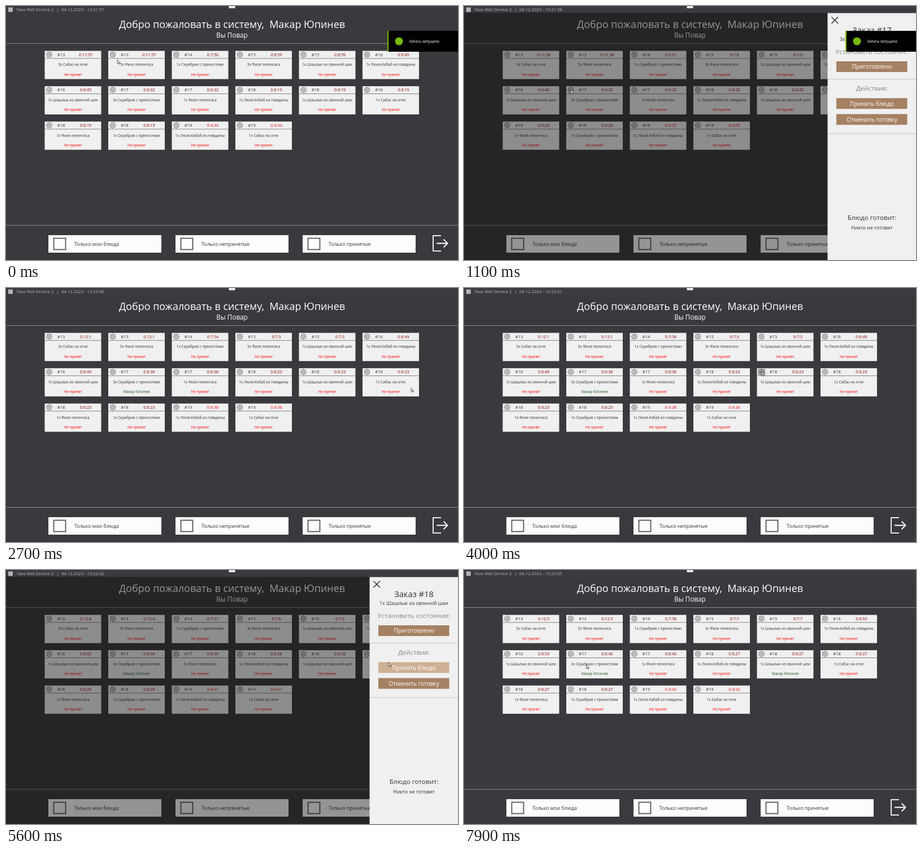
An HTML page for the animation above (8 s loop, 800 px wide and 450 px high).

```html
<!DOCTYPE html>
<html lang="ru">
<head>
<meta charset="utf-8">
<title>Заказы</title>
<style>
html, body { margin: 0; width: 100%; height: 100%; overflow: hidden; background: #3a393e; }
svg { display: block; width: 800px; height: 450px; font-family: "Open Sans", "Noto Sans", sans-serif; }
text { white-space: pre; }
</style>
</head>
<body>
<svg id="stage" viewBox="0 0 800 450"></svg>
<script>
const LOOP = 8000, STEP = 100;
const COOK = 'Макар Юпинев';
const DISHES = {
  s: 'Сибас на огне', f: 'Филе пеленгаса', m: 'Скумбрия с пряностями',
  k: 'Шашлык из свинной шеи', l: 'Люля-Кебаб из говядины'
};
// order number -> age in seconds at the start
const AGE = { 13: 717, 14: 470, 15: 419, 16: 405, 17: 392, 18: 379, 19: 274 };
const ORDERS = ('13 3s,13 5f,14 1m,15 3f,15 1k,16 1l,16 1k,17 3m,' +
  '17 1f,18 1l,18 1k,18 1s,18 1f,18 1m,19 1l,19 1s').split(',');

// times at which a second passes; the clock is drawn a little after the timers
const TICKS = [500, 1800, 2000, 2700, 4200, 5500, 5500, 7200];
const CLOCK_LAG = 200;
// dishes opened in the side panel and accepted on closing
const VISITS = [{ card: 7, open: 1100, close: 2700 }, { card: 10, open: 5300, close: 5900 }];

const stage = document.getElementById('stage');

function add(tag, attrs, parent = stage) {
  const el = document.createElementNS('http://www.w3.org/2000/svg', tag);
  for (const k in attrs) el.setAttribute(k, attrs[k]);
  parent.appendChild(el);
  return el;
}
const rect = (x, y, width, height, fill, parent) => add('rect', { x, y, width, height, fill }, parent);
const line = (d, stroke, w, parent) => add('path', { d, stroke, 'stroke-width': w, fill: 'none' }, parent);
function text(str, x, y, size, fill, parent, anchor = 'middle') {
  const el = add('text', { x, y, 'font-size': size, fill, 'text-anchor': anchor }, parent);
  el.textContent = str;
  return el;
}
function put(el, str) {
  if (el.textContent !== str) el.textContent = str;
}
const show = (el, on) => el.setAttribute('display', on ? 'inline' : 'none');

function gearPath(cx, cy) {
  const pts = [];
  for (let i = 0; i < 32; i++) {
    const r = i % 4 < 2 ? 5 : 3.9;
    const a = (i - 0.5) * Math.PI / 16;
    pts.push((cx + r * Math.cos(a)).toFixed(2) + ' ' + (cy + r * Math.sin(a)).toFixed(2));
  }
  return 'M' + pts.join('L') + 'Z';
}

function makeCard(order, i) {
  const [num, item] = order.split(' ');
  const x = 68.5 + 112.5 * (i % 6), y = 79.5 + 62.6 * Math.floor(i / 6);
  const gear = [x + 8, y + 6.6];
  const dish = item[0] + 'x ' + DISHES[item[1]];
  rect(x, y, 100, 50, '#f0f0f0');
  const hover = rect(x + 2, y + 0.5, 13, 12, '#b4b4b4');
  line(gearPath(...gear), '#3c3c3c', 0.8);
  add('circle', { cx: gear[0], cy: gear[1], r: 1.9, fill: 'none', stroke: '#3c3c3c', 'stroke-width': 0.8 });
  line(`M${x} ${y + 13.4}h100`, '#777', 0.9);
  text('#' + num, x + 29, y + 9.1, 7.5, '#333');
  const timer = text('', x + 72.5, y + 9.1, 7.2, AGE[num] < 300 ? '#f01010' : '#8b0000');
  text(dish, x + 50, y + 26.8, 6.4, '#333');
  const status = text('', x + 50, y + 44.3, 6.3, '#f00');
  return { num, dish, x, y, gear, hover, timer, status };
}

// main screen
rect(0, 0, 800, 450, '#3a393e');
text('Добро пожаловать в систему,  ' + COOK, 400, 38.8, 17.9, '#fff');
text('Вы Повар', 400, 55.6, 11.7, '#fff');
line('M0 66.5H800M0 388.5H800', '#88888a', 1);
const cards = ORDERS.map(makeCard);

['Только мои блюда', 'Только непринятые', 'Только принятые'].forEach((label, i) => {
  const x = 75 + 225 * i;
  rect(x, 406, 200, 31, '#fdfdfd');
  add('rect', { x: x + 9.5, y: 411.5, width: 21, height: 20, fill: 'none', stroke: '#555', 'stroke-width': 1.8 });
  text(label, x + 46, 424.6, 8.8, '#333', stage, 'start');
});
line('M770 406.8H756V434.2H770M762 420.5H781.5M774.5 413.5L781.5 420.5L774.5 427.5', '#fff', 1.8);

// side panel
const panel = add('g', {});
add('rect', { x: 0, y: 12, width: 800, height: 438, fill: '#0a0a0a', opacity: 0.43 }, panel);
rect(643.5, 12.5, 156.5, 437.5, '#f0f0f0', panel);
line('M650.5 19.5L662 31M662 19.5L650.5 31', '#222', 1.3, panel);
const panelTitle = text('', 722, 47.5, 14.7, '#333', panel);
const panelDish = text('', 722, 61.5, 8.8, '#333', panel);
text('Установить состояние:', 722, 85, 11.6, '#858585', panel);
text('Действия:', 722, 150.2, 11.6, '#858585', panel);
line('M644 129.5H800M644 226H800', '#c4c4c4', 1, panel);
const buttons = [['Приготовлено', 98], ['Принять блюдо', 163.3], ['Отменить готовку', 191.5]].map(([label, y]) => {
  const box = rect(659, y, 125.5, 19, '#a58163', panel);
  text(label, 722, y + 13.2, 10.2, '#fff', panel);
  return { y, box };
});
text('Блюдо готовит:', 722, 379.4, 11.6, '#333', panel);
text('Никто не готовит', 722, 396, 8.75, '#333', panel);

// window bar
rect(0, 0, 800, 12, '#3b3a40');
rect(4, 2.5, 8, 8, '#b4b4b6');
text('Tavo Relt Service 2', 18.5, 8.8, 7.7, '#b9b9bb', stage, 'start');
text('|', 91.5, 8.8, 7.7, '#b9b9bb');
const clock = text('', 98, 8.8, 7.65, '#b9b9bb', stage, 'start');
rect(394.5, 0, 11, 4, '#e8e8e8');

// notification
const note = add('g', {});
rect(675, 44, 125, 37, '#76b900', note);
const noteBody = rect(677, 44, 123, 37, '#000', note);
const noteLabel = add('g', {}, note);
add('circle', { cx: 695.5, cy: 62.5, r: 7, fill: '#76b900' }, noteLabel);
text('Запись запущена', 713.5, 65, 6.25, '#fff', noteLabel, 'start');

const pointer = add('path', {
  d: 'M0 0V6.6L1.6 5.2L2.8 7.8L3.9 7.3L2.8 4.8H4.9Z',
  fill: '#fff', stroke: '#222', 'stroke-width': 0.7
});

// pointer trips: start, end, target, sag of the path
const TRIPS = [
  [0, 900, cards[7].gear, 0],
  [1300, 2000, [717, 177], 0],
  [2800, 3200, [82, 415], 0],
  [3200, 3700, cards[10].gear, 0],
  [5300, 5700, [704.5, 166.5], 0],
  [7000, 7900, [216.5, 168], 50]
];

const ramp = (t, from, to) => Math.max(0, Math.min(1, (t - from) / (to - from)));
const ticked = t => TICKS.filter(s => s <= t).length;

function pointerAt(t) {
  let x = 197, y = 95.5;
  for (const [from, to, goal, sag] of TRIPS) {
    const p = ramp(t, from, to), e = p * p * (3 - 2 * p);
    x += (goal[0] - x) * e;
    y += (goal[1] - y) * e + sag * Math.sin(Math.PI * e);
  }
  return [x, y];
}

function render(now) {
  const t = Math.floor(now % LOOP / STEP) * STEP;
  const [px, py] = pointerAt(t);
  const inside = (x, y, w, h) => px >= x && px < x + w && py >= y && py < y + h;
  const visit = VISITS.find(v => t >= v.open && t < v.close);

  const sec = 57 + ticked(t - CLOCK_LAG);
  put(clock, `04.12.2023 - 13:${21 + Math.floor(sec / 60)}:${String(sec % 60).padStart(2, '0')}`);

  cards.forEach((c, i) => {
    const age = AGE[c.num] + ticked(t);
    const taken = VISITS.some(v => v.card === i && t >= v.close);
    put(c.timer, `0:${Math.floor(age / 60)}:${age % 60}`);
    put(c.status, taken ? COOK : 'Не принят');
    c.status.setAttribute('fill', taken ? '#1c5a22' : '#f00');
    show(c.hover, !visit && inside(c.x + 2, c.y, 13, 13));
  });

  show(panel, visit);
  if (visit) {
    put(panelTitle, 'Заказ #' + cards[visit.card].num);
    put(panelDish, cards[visit.card].dish);
    buttons.forEach(b => b.box.setAttribute('fill', inside(659, b.y, 125.5, 19) ? '#cfb095' : '#a58163'));
  }

  // the black part leaves first, then the green one
  show(noteLabel, t <= 2000);
  noteBody.setAttribute('transform', `translate(${123 * ramp(t, 2000, 2263)} 0)`);
  note.setAttribute('transform', `translate(${125 * ramp(t, 2300, 2600)} 0)`);
  show(note, t < 2600);

  pointer.setAttribute('transform', `translate(${px.toFixed(2)} ${py.toFixed(2)})`);
}

const start = performance.now();
function loop() {
  render(performance.now() - start);
  requestAnimationFrame(loop);
}
loop();
</script>
</body>
</html>
```
